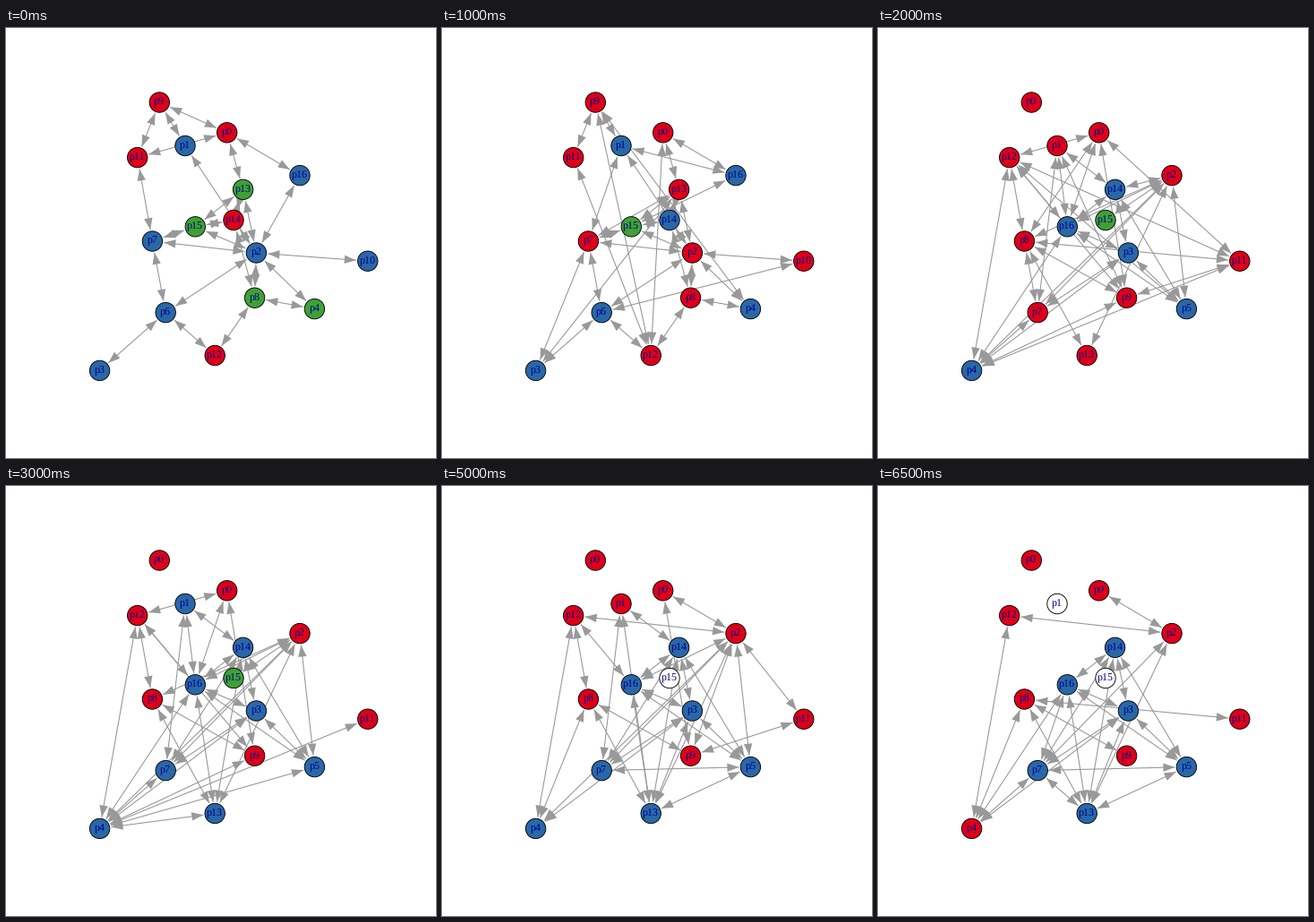
These frames come from a looping animation (480x480 px, 7 s). A matplotlib script:

```python
import numpy as np
import matplotlib.pyplot as plt
from matplotlib.animation import FuncAnimation
from matplotlib.collections import LineCollection, PolyCollection
from matplotlib.patches import Circle

plt.rcParams["text.hinting"] = "none"

SIZE, DPI, STEP = 480, 80, 500
PX = 72 / DPI
RADIUS, TIP, HEAD, HALF = 11.2, 13, 13, 4.7
FILL = {"r": "#de0019", "b": "#2a67a8", "g": "#3fa135", "w": "#ffffff"}
GREY, INK = "#999999", "#00008b"
RELABEL = 4

NODES = "ABCDEFGHIJKLMNOP"
XY = dict(zip(NODES, np.array([
    (171.3, 83), (146.7, 144.6), (200, 131.5), (246.7, 116.8),
    (328, 164.6), (264.6, 180.3), (254, 214.5), (211.3, 221.8),
    (163.4, 238), (279.4, 251), (403.8, 260.2), (277.6, 301.2),
    (344.4, 313.6), (178.2, 317.6), (233.2, 365.5), (104.6, 382.4)])))

# peers are numbered in this order; number 5 is not in the network
RANK = "DCJPM.NILAKBOFGHE"

# each step: new colours, links cut, links joined; "A:BC" is A-B and A-C
STEPS = [
    ("r:ABDGO g:FHLM", "",
     "A:BCD B:DI C:J D:EF E:J F:GHJ G:HJL H:IJ I:JN J:KLMN L:MO N:OP"),
    ("g:K r:FI b:M", "A:D", "A:O D:O K:P"),
    ("r:JKL b:G", "B:DI E:J K:P", "A:M B:O C:EI E:H F:IP I:P K:N"),
    ("r:CP", "C:E K:N", "B:D D:I"),
    ("r:EN g:G b:FHJP", "all",
     "B:DHIKLMP C:FHLN D:HIKL E:FGHIMNOP F:HJM H:JMP I:KLNO J:MNP "
     "K:LP L:P N:P"),
    ("b:CO", "B:KM C:L D:IK E:F I:KN K:L", "H:O"),
    ("b:N", "", "F:NO M:P O:P"),
    ("", "B:L I:L M:P", "D:K I:K"),
    ("w:G g:P", "E:G", "B:E C:O E:L J:O M:NO"),
    ("r:P", "B:D D:HK O:P", "D:E E:K"),
    ("r:C b:P", "C:H E:I H:P I:K K:P L:P N:P", "I:LP K:L"),
    ("", "E:KLM K:L", "H:P"),
    ("g:C", "B:HI C:FNO D:L E:HP", "H:N I:K N:O"),
    ("w:C r:P", "", "N:P"),
]


def pairs(text):
    return {(a, b) for a, _, *rest in text.split() for b in rest}


def build():
    """Run through the steps and keep the state after each one."""
    colour, edges, states = dict.fromkeys(NODES, "b"), set(), []
    for paint, cut, join in STEPS:
        colour.update({node: c for c, node in pairs(paint)})
        edges = set() if cut == "all" else edges - pairs(cut)
        edges |= pairs(join)
        states.append((dict(colour), sorted(edges)))
    return states


def number(node, step):
    """Peers move up by one at the relabelling; two of them wrap round."""
    k = RANK.index(node)
    if step < RELABEL:
        return k
    return {9: 0, 16: 2}.get(k, k + (k > 1))


def arrow(a, b):
    """Line between two discs and the heads at both ends."""
    p, q = XY[a], XY[b]
    u = (q - p) / np.hypot(*(q - p))
    n = np.array([-u[1], u[0]]) * HALF
    p, q = p + u * TIP, q - u * TIP
    p2, q2 = p + u * HEAD, q - u * HEAD
    return (p, q), [(p, p2 + n, p2 - n), (q, q2 + n, q2 - n)]


fig = plt.figure(figsize=(SIZE / DPI, SIZE / DPI), dpi=DPI, facecolor="white")
ax = fig.add_axes([0, 0, 1, 1])
ax.set(xlim=(0, SIZE), ylim=(SIZE, 0))
ax.axis("off")

lines = LineCollection([], colors=GREY, linewidths=1.1 * PX, zorder=1)
heads = PolyCollection([], facecolors=GREY, edgecolors="none", zorder=2)
ax.add_collection(lines, autolim=False)
ax.add_collection(heads, autolim=False)

discs, labels = {}, {}
for node, (x, y) in XY.items():
    discs[node] = ax.add_patch(Circle((x, y), RADIUS, ec="black",
                                      lw=0.9 * PX, zorder=3))
    labels[node] = ax.text(x, y, "", ha="center", va="center", color=INK,
                           family="Liberation Serif", size=12 * PX, zorder=4)

states = build()


def draw(i):
    colour, edges = states[i]
    parts = [arrow(*e) for e in edges]
    lines.set_segments([seg for seg, _ in parts])
    heads.set_verts([tri for _, ends in parts for tri in ends])
    for node in NODES:
        discs[node].set_facecolor(FILL[colour[node]])
        labels[node].set_text(f"p{number(node, i)}")
    return [lines, heads, *discs.values(), *labels.values()]


anim = FuncAnimation(fig, draw, frames=len(states), interval=STEP,
                     repeat=True, repeat_delay=0, blit=False)
plt.show()
```
